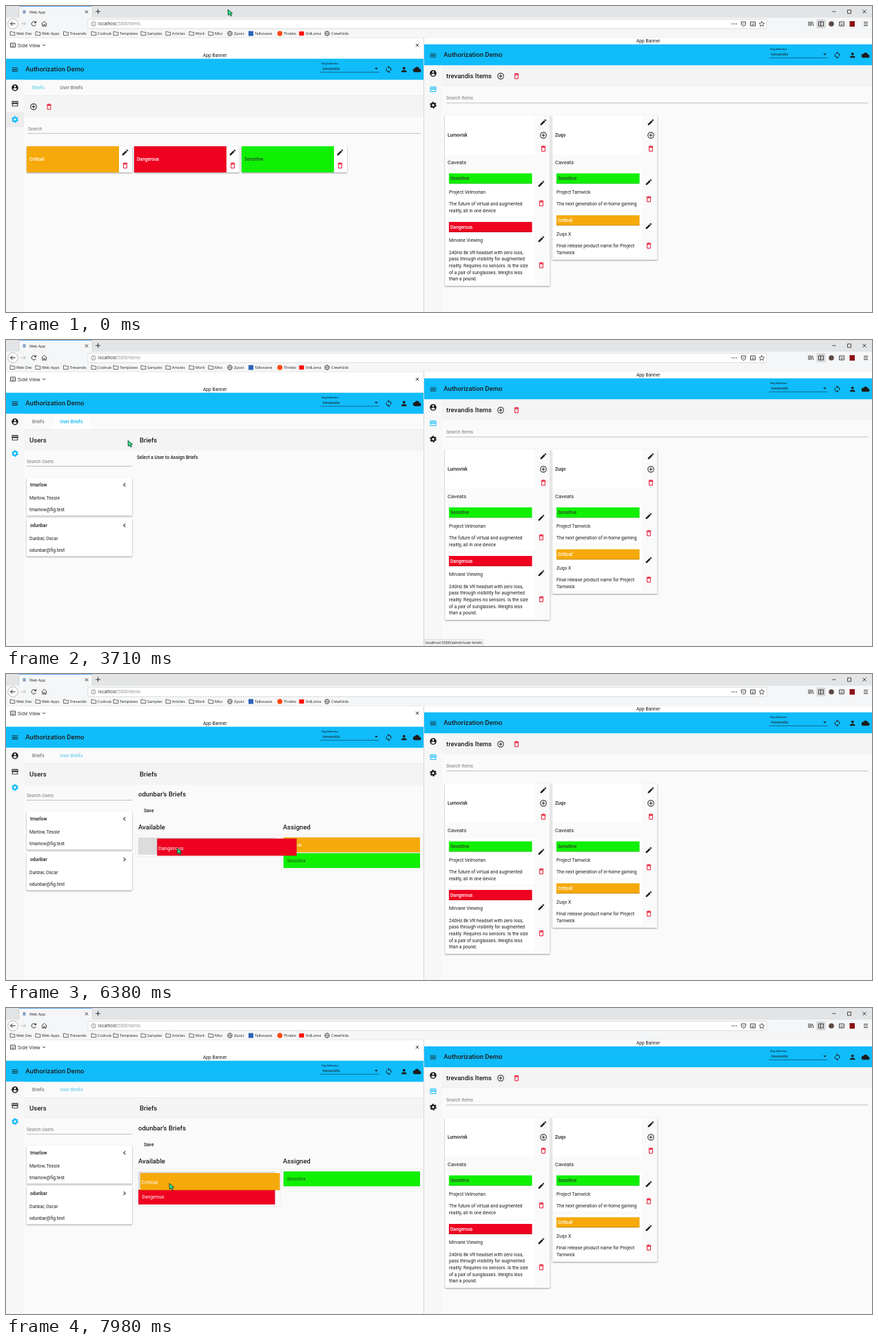
Write an HTML page that moves like this. It is 1257 by 445 pixels and loops after 8 s.

```html
<!DOCTYPE html>
<html lang="en">
<head>
<meta charset="utf-8">
<title>Authorization Demo</title>
<style>
html, body { margin: 0; width: 100%; height: 100%; overflow: hidden; background: #fafafa; }
svg { display: block; width: 100%; height: 100%; }
text { font-family: Roboto, sans-serif; white-space: pre; }
.ui { font-family: "Open Sans", "Noto Sans", sans-serif; }
.card { filter: drop-shadow(0 1px 1px rgba(0,0,0,.38)); }
.drag { filter: drop-shadow(0 .7px .7px rgba(0,0,0,.32)); }
</style>
</head>
<body>
<svg id="stage" viewBox="0 0 1257 445"></svg>
<script>
const LOOP = 8000;
const BLUE = '#10bcfa', RED = '#e8112d', INK = '#1c1c1c', GREY = '#7c7c7c';
const BODY = 6.7, HEAD = 9.56;
const BRIEF = {
  Critical: { fill: '#f6a90a', ink: '#fff' },
  Dangerous: { fill: '#ee0220', ink: '#fff' },
  Sensitive: { fill: '#10f004', ink: '#27472a' }
};
const ORG = 'trevandis';

const ICON = {
  menu: 'M3 18h18v-2H3zM3 13h18v-2H3zM3 6v2h18V6z',
  account: 'M12 2a10 10 0 1 0 0 20a10 10 0 1 0 0-20zM12 5a3 3 0 1 1 0 6a3 3 0 1 1 0-6zM12 19.2c-2.5 0-4.7-1.3-6-3.2c0-2 4-3.1 6-3.1s6 1.1 6 3.1c-1.3 1.9-3.5 3.2-6 3.2z',
  store: 'M3 4h18l1 6a3 3 0 0 1-1 2v8H3v-8a3 3 0 0 1-1-2zM5 13h14v5H5zM5 6h3v4H4.3zM10 6h4v4h-4zM16 6h3l.7 4H16z',
  edit: 'M3 17.2V21h3.8L17.8 9.9l-3.7-3.7zM20.7 7c.4-.4.4-1 0-1.4l-2.3-2.3c-.4-.4-1-.4-1.4 0l-1.9 1.8l3.8 3.8z',
  trash: 'M6 7h12v12a2 2 0 0 1-2 2H8a2 2 0 0 1-2-2zM8 9h8v10H8zM15.5 4l-1-1h-5l-1 1H5v2h14V4z',
  add: 'M13 7h-2v4H7v2h4v4h2v-4h4v-2h-4zM12 2a10 10 0 1 0 0 20a10 10 0 1 0 0-20zM12 4a8 8 0 1 1 0 16a8 8 0 1 1 0-16z',
  person: 'M12 4a4 4 0 1 0 0 8a4 4 0 1 0 0-8zM12 14c-2.7 0-8 1.3-8 4v2h16v-2c0-2.7-5.3-4-8-4z',
  cloud: 'M19.3 10A7.5 7.5 0 0 0 5.3 8A6 6 0 0 0 6 20h13a5 5 0 0 0 .3-10z',
  sync: 'M12 4V1L8 5l4 4V6a6 6 0 0 1 5.3 8.8l1.5 1.5A8 8 0 0 0 12 4zM12 18a6 6 0 0 1-5.3-8.8L5.2 7.7A8 8 0 0 0 12 20v3l4-4l-4-4z',
  left: 'M15.4 7.4L14 6l-6 6l6 6l1.4-1.4L10.8 12z',
  right: 'M10 6L8.6 7.4l4.6 4.6l-4.6 4.6L10 18l6-6z',
  drop: 'M7 10l5 5l5-5z'
};

// Drawing helpers; text is placed by its left edge and cap centre.
const text = (x, cy, s, size = BODY, fill = INK, weight = 400, cls = '') =>
  `<text x="${x}" y="${cy + size * .355}" font-size="${size}" fill="${fill}" font-weight="${weight}" class="${cls}">${s}</text>`;
const bold = (x, cy, s, size = BODY, fill = INK) => text(x, cy, s, size, fill, 500);
const ui = (x, cy, s, size = 5.5, fill = '#222') => text(x, cy, s, size, fill, 400, 'ui');
const rect = (x, y, w, h, fill, more = '') =>
  `<rect x="${x}" y="${y}" width="${w}" height="${h}" fill="${fill}" ${more}/>`;
const line = (d, stroke = '#333', w = .9, more = '') =>
  `<path d="${d}" fill="none" stroke="${stroke}" stroke-width="${w}" ${more}/>`;
const dot = (cx, cy, r, fill, more = '') => `<circle cx="${cx}" cy="${cy}" r="${r}" fill="${fill}" ${more}/>`;
const icon = (name, cx, cy, fill = INK, size = 11.5) =>
  `<path d="${ICON[name]}" fill="${fill}" fill-rule="evenodd" transform="translate(${cx - size / 2} ${cy - size / 2}) scale(${size / 24})"/>`;
const gear = (cx, cy, c) =>
  dot(cx, cy, 2.7, 'none', `stroke="${c}" stroke-width="2"`) +
  dot(cx, cy, 4, 'none', `stroke="${c}" stroke-width="1.6" stroke-dasharray="2.39 1.8"`);
const group = (id, body, more = '') => `<g id="${id}" ${more}>${body}</g>`;
const card = (x, y, w, h, body) => `<g class="card">${rect(x, y, w, h, '#fff', 'rx="1"')}</g>${body}`;
const tools = (x, y1, y2) => icon('edit', x, y1) + icon('trash', x, y2, RED);

const folder = (x, cy) => line(`M${x} ${cy + 2.6}v-5.4h2.6l.8 1h3.4v4.4z`, '#444', .8);
const globe = (x, cy) =>
  dot(x + 4, cy, 3.4, 'none', 'stroke="#444" stroke-width=".8"') +
  line(`M${x + .6} ${cy}h6.8M${x + 4} ${cy - 3.4}q-3.2 3.4 0 6.8q3.2-3.4 0-6.8`, '#444', .6);
const cross = (x, y, r, c = '#222') => line(`M${x - r} ${y - r}l${2 * r} ${2 * r}m0 ${-2 * r}l${-2 * r} ${2 * r}`, c, .9);
const panel = (x, y) => line(`M${x - 3.5} ${y - 3}h7v6h-7zM${x - 1.7} ${y - .8}h1.2m1.2 0h1.2M${x - 1.7} ${y + 1.2}h3.4`, '#333', .9);

function browser() {
  const folders = [[6, 'Web Dev'], [43, 'Web Apps'], [83.5, 'Trevandis'], [124, 'Codnub'], [156, 'Templates'],
    [196, 'Samples'], [232, 'Articles'], [266, 'Work'], [294, 'Misc']];
  const links = [[321, 'Zpost'], [351, 'Talkovane', rect(352, 36.5, 7, 7, '#2d63b8')], [393, 'Threbo', dot(397.5, 40, 3.7, '#ff4a12')],
    [425, 'VidLoma', rect(425.5, 37, 7, 6, '#f00')], [462, 'Crewfolds']];
  return rect(0, 0, 1257, 17, '#e3e4e6') + rect(0, 17, 1257, 29.5, '#f5f6f7') +
    rect(19, 0, 106, 17, '#f5f6f7') + rect(19, 0, 106, .7, '#1a8cff') +
    line('M18.7 1v15.5M125.3 1v15.5', '#c5c6c8', .6) +
    rect(24.5, 6, 4, 5, '#8aa4c4') + ui(34, 8.8, 'Web App') + cross(117, 8.5, 2.1) +
    line('M130 8h7M133.5 4.5v7', '#222') +
    line('M1199.5 8.2h5') + line('M1221.5 5.8h5v5h-5z') + cross(1246, 8.2, 2.5) +
    dot(10, 25.8, 7.3, '#fff', 'stroke="#aaa" stroke-width=".8"') +
    line('M13.5 25.8h-7m3-3l-3 3l3 3', '#222', 1) +
    line('M21.5 25.8h7m-3-3l3 3l-3 3', '#b9babc', 1) +
    line('M43 24a3.2 3.2 0 1 0 .3 3M43.6 22v2.5h-2.5', '#333', 1) +
    line('M51.5 26l4-3.7l4 3.7M52.8 25.5v3.8h2v-2.3h1.5v2.3h2v-3.8', '#333') +
    rect(119, 19.2, 985, 13.6, '#fff', 'rx="1" stroke="#cfd0d2" stroke-width=".7"') +
    dot(127, 26, 3.2, 'none', 'stroke="#666" stroke-width=".7"') + line('M127 25.5v2.2M127 24v.8', '#666', .8) +
    ui(134, 26, 'localhost<tspan fill="#85878b">:5000/items</tspan>', 6.3) +
    [1054, 1057, 1060].map(x => dot(x, 26, .8, '#333')).join('') +
    line('M1067.3 23h6.4v3q-.3 2.5-3.2 3.5q-2.9-1-3.2-3.5zM1069 25.2l1.5 1.5l1.5-1.5') + panel(1084, 26) +
    line('M1097 22.3l1.1 2.5l2.7.3l-2 1.8l.6 2.7l-2.4-1.4l-2.4 1.4l.6-2.7l-2-1.8l2.7-.3z', '#333', .8) +
    line('M1165 22.5v6.5M1167 22.5v6.5M1169 22.5v6.5M1170.5 23l1.6 6', '#333') +
    rect(1176.5, 19.5, 13, 13, '#d5d6d8', 'rx="1"') + line('M1179.5 23h7v6h-7zM1182.5 23v6', '#333') +
    dot(1198, 26, 3.8, '#5a4a44') + panel(1213, 26) + rect(1224.5, 22, 7.5, 8, '#8c1016') +
    line('M1245 23.5h6M1245 26h6M1245 28.5h6', '#333') +
    folders.map(([x, s]) => folder(x, 40) + ui(x + 9, 40.5, s)).join('') +
    links.map(([x, s, mark]) => (mark || globe(x, 40)) + ui(x + 10, 40.5, s)).join('') +
    rect(0, 46, 606, 21.5, '#fff') + line('M0 46.3h1257', '#d8d8d8', .6) +
    panel(10, 57) + ui(17, 57, 'Side View', 7.4) + line('M53.2 56l1.9 1.9l1.9-1.9', '#333', 1) + cross(597, 57, 2.2);
}

function app(x, y, w, banner, active) {
  const r = x + w, cy = y + 15.2;
  const tone = n => n === active ? BLUE : INK;
  return rect(x, y - 9.5, w, 9.5, '#fff') + text(banner, y - 4.8, 'App Banner') +
    rect(x, y + 30.6, w, 445 - y - 30.6, '#fafafa') +
    rect(x, y, w, 30.6, BLUE) + icon('menu', x + 13, cy + .5) + bold(x + 28.3, cy, 'Authorization Demo', HEAD) +
    bold(r - 148, y + 6.3, 'Org Selector', 4.4, '#0b2e3c') + text(r - 146.5, y + 14.2, ORG, 6.1) +
    line(`M${r - 149.5} ${y + 19.6}h85`, '#0b4a63', .7) + icon('drop', r - 68.5, y + 14.3) +
    icon('sync', r - 50.5, cy + .5) + icon('person', r - 28.3, cy + .5) + icon('cloud', r - 9.3, cy + .5) +
    rect(x, y + 30.6, 26, 415, '#f7f7f7') +
    icon('account', x + 13, y + 42.2) + icon('store', x + 13, y + 65.3, tone(1)) + gear(x + 13, y + 88.3, tone(0));
}

function briefCard(name, x) {
  const b = BRIEF[name];
  return card(x, 204, 153, 38, rect(x, 204, 134, 38, b.fill) + bold(x + 4, 222.5, name, BODY, b.ink) + tools(x + 143, 213, 232));
}

function userCard(y, id, name, mail, arrow) {
  return card(30, y, 153, 55.5, bold(35, y + 10.5, id) + text(34, y + 29.5, name) + text(34, y + 46.5, mail) + arrow);
}

function caveat(x, y, h, name, title, lines, y1, y2) {
  const b = BRIEF[name];
  return rect(x + 2, y - 4, 128, h, '#fff') + rect(x + 5.9, y, 120.7, 15, b.fill) +
    rect(x + 5.9, y + 14.4, 120.7, .6, 'rgba(0,0,0,.3)') +
    bold(x + 8, y + 7.5, name, BODY, b.ink) + text(x + 6, y + 27.1, title) +
    lines.map((s, i) => text(x + 6, y + 44.4 + i * 9.65, s)).join('') + tools(x + 140, y1, y2);
}

function itemCard(x, h, name, body) {
  return `<g class="card">${rect(x, 159, 152.5, h, '#fafafa', 'rx="1"')}</g>` + rect(x, 159, 130, 57, '#fff') +
    bold(x + 4, 187.5, name) + icon('edit', x + 143, 169) + icon('add', x + 143, 188) +
    icon('trash', x + 143, 207.5, RED) + text(x + 4, 227, 'Caveats', 7.6) + body;
}

function rightApp() {
  return app(607, 55.8, 650, 915, 1) + rect(633, 86.4, 624, 30.6, '#f4f4f4') +
    bold(639, 102, ORG + ' Items', HEAD) + icon('add', 718, 102) + icon('trash', 741, 102, RED) +
    text(639, 134, 'Search Items', BODY, GREY) + line('M639 141h612', '#999', .6) +
    itemCard(637, 248, 'Lumovisk',
      caveat(637, 243.4, 67, 'Sensitive', 'Project Velmorian', ['The future of virtual and augmented', 'reality, all in one device'], 258.5, 287) +
      caveat(637, 314, 93, 'Dangerous', 'Mirvane Viewing', ['240Hz 8k VR headset with zero loss,', 'pass through visibility for augmented',
        'reality. Requires no sensors. Is the size', 'of a pair of sunglasses. Weighs less', 'than a pound.'], 339, 377)) +
    itemCard(793, 210, 'Zuqo',
      caveat(793, 243.4, 56, 'Sensitive', 'Project Tarnwick', ['The next generation of in-home gaming'], 256, 281) +
      caveat(793, 304.3, 64, 'Critical', 'Zuqo X', ['Final release product name for Project', 'Tarnwick'], 320, 348.5));
}

// Geometry of the two brief lists.
const LIST = { a: 192.2, b: 402.8, top: 237.7, step: 22.9, gap: 3.5 };

function leftApp() {
  const bar = rect(26, 130.8, 580, 30.4, '#f4f4f4');
  const outline = 'stroke="#ebebeb" stroke-width=".8"';
  return app(0, 76.7, 606, 286, 0) + line('M26 130.7h580', '#dcdcdc', .7) +
    group('railGlow', rect(0, 154, 26, 22, '#ececec') + gear(13, 165, BLUE)) +
    group('tabGlow', rect(69, 108, 54, 22, '#fff', 'opacity=".7"')) +
    group('tabA', bold(38, 119, 'Briefs')) + group('tabB', bold(78.3, 119, 'User Briefs')) +
    group('briefs', bar + icon('add', 40, 146.5) + icon('trash', 62.5, 146.5, RED) + text(32, 178.5, 'Search', BODY, GREY) +
      line('M31 185.3h571', '#999', .6) + Object.keys(BRIEF).map((n, i) => briefCard(n, 30 + i * 156)).join('')) +
    group('users', bar + bold(34, 146, 'Users', HEAD) + bold(194, 146, 'Briefs', HEAD) +
      text(30, 176.5, 'Search Users', BODY, GREY) + line('M30 183.5h153', '#999', .6) +
      userCard(200, 'tmarlow', 'Marlow, Tessie', 'tmarlow@fig.test', icon('left', 172, 210.5)) +
      userCard(259, 'odunbar', 'Dunbar, Oscar', 'odunbar@fig.test',
        group('shut', icon('left', 172, 269.5)) + group('open', icon('right', 172, 269.5))) +
      group('hint', bold(190, 171, 'Select a User to Assign Briefs')) +
      group('picker', bold(192, 174.5, "odunbar's Briefs", HEAD) + bold(200, 198.5, 'Save') +
        bold(192, 222.5, 'Available', HEAD) + bold(402, 222.5, 'Assigned', HEAD) +
        rect(188.5, 234, 209.5, 28, '#fafafa', outline + ' id="listA"') + rect(399.5, 234, 205.5, 74, '#fafafa', outline + ' id="listB"') +
        rect(0, 0, 199, 25, '#dcdcdc', 'id="slot"') + Object.keys(BRIEF).map(chip).join('')));
}

// One brief in a list, with a larger face while it is being dragged.
function chip(name) {
  const b = BRIEF[name];
  return group(name, group(name + 'Flat', rect(0, 0, 198.2, 21.5, b.fill) + text(5.3, 10.8, name, BODY, b.ink)) +
    group(name + 'Lift', rect(0, 0, 202.3, 24.8, b.fill) + text(1.5, 13.6, name, 7.65, b.ink)), 'class="drag"');
}

const pointer = group('cursor',
  group('arrow', '<path d="M0 0L.4 8.4L2.4 6.8L4 9.7L5.6 8.8L4.2 6.1L6.7 5.6z"/>') +
  group('hand', '<path d="M1.2.4Q2.4-.6 3 .8L3.8 3.8L6.6 4.4Q8.3 4.9 8 6.8L7.3 10H3L.4 6.8Q.2 5.4 2 6z"/>'),
  'fill="#2fe08a" stroke="#12452c" stroke-width=".9" stroke-linejoin="round"');

document.getElementById('stage').innerHTML = browser() + leftApp() + rightApp() +
  line('M606.5 46v399', '#d0d0d0', .8) +
  group('status', rect(607, 435.5, 86, 10, '#f0f0f0', 'stroke="#ccc" stroke-width=".5"') + ui(609, 440.5, 'localhost:5000/admin/user-briefs', 5.3)) +
  pointer;

const el = id => document.getElementById(id);
const show = (id, on) => el(id).setAttribute('display', on ? 'inline' : 'none');
const place = (id, x, y) => el(id).setAttribute('transform', `translate(${x} ${y})`);
const ramp = (t, start, length) => { const u = Math.min(1, Math.max(0, (t - start) / length)); return u * u * (3 - 2 * u); };
const between = (t, a, b) => t >= a && t < b;
const mix = (a, b, u) => a + (b - a) * u;

// Pointer track: time, x, y.
const TRACK = [
  [0, 322, 5], [1720, 322, 5], [2410, 185, 98], [2550, 131, 112], [2760, 99, 118], [3370, 95, 119], [3450, 97, 119],
  [3710, 177, 146], [4180, 172, 266], [4520, 173, 268], [4980, 377, 268], [5070, 388, 269], [5400, 426, 271],
  [5890, 432, 274], [5940, 428, 275], [6480, 232, 251], [6740, 230, 251], [7080, 425, 248], [7250, 445, 253],
  [7330, 445, 253], [7545, 303, 246], [7720, 246, 254], [7980, 237, 255], [8000, 237, 255]
];

function slope(i, k) {
  if (!TRACK[i - 1] || !TRACK[i + 1]) return 0;
  const [p, c, n] = TRACK.slice(i - 1, i + 2);
  const a = (c[k] - p[k]) / (c[0] - p[0]), b = (n[k] - c[k]) / (n[0] - c[0]);
  return a * b <= 0 ? 0 : 2 * a * b / (a + b);
}

function pointerAt(t) {
  let i = 0;
  while (i < TRACK.length - 2 && t >= TRACK[i + 1][0]) i++;
  const a = TRACK[i], b = TRACK[i + 1], h = b[0] - a[0], u = (t - a[0]) / h, v = 1 - u;
  return [1, 2].map(k => v * v * (1 + 2 * u) * a[k] + u * u * (3 - 2 * u) * b[k] +
    h * u * v * (v * slope(i, k) - u * slope(i + 1, k)));
}

const TAB = 2900, PICK = 4450;
const GRAB1 = 5890, ENTER1 = 6060, DROP1 = 6600, LAND1 = 6800;
const GRAB2 = 7330, ENTER2 = 7420;

function render(t) {
  const [x, y] = pointerAt(t);
  const users = t >= TAB, picked = t >= PICK;
  show('briefs', !users);
  show('users', users);
  show('railGlow', !users);
  show('tabGlow', between(t, 2700, PICK));
  el('tabA').firstChild.setAttribute('fill', users ? GREY : '#6fd0ea');
  el('tabB').firstChild.setAttribute('fill', !users ? (t > 2700 ? '#333' : GREY) : picked ? '#6fd0ea' : BLUE);
  show('status', between(t, 2680, 3740));
  show('hint', !picked);
  show('picker', picked);
  show('shut', !picked);
  show('open', picked);

  const { a, b, top, step, gap } = LIST, wide = step + gap;
  const drag1 = between(t, GRAB1, LAND1), drag2 = t >= GRAB2;
  const home = ramp(t, DROP1, LAND1 - DROP1), in1 = ramp(t, ENTER1, 130), in2 = ramp(t, ENTER2, 130);
  if (drag1) place('Dangerous', mix(x - 29, a, home), mix(y - 13.7, top, home));
  else if (t < GRAB1) place('Dangerous', b, top + step);
  else place('Dangerous', a, top + wide * in2);
  if (drag2) place('Critical', x - 42, y - 15);
  else place('Critical', b, top);
  place('Sensitive', b, top + 2 * step + gap * ((t >= GRAB1) + drag2) - wide * (in1 + in2));
  for (const [name, on] of [['Dangerous', drag1], ['Critical', drag2], ['Sensitive', false]]) {
    show(name + 'Flat', !on);
    show(name + 'Lift', on);
  }
  // The held brief is painted above the others.
  const held = el(drag1 ? 'Dangerous' : 'Critical');
  if (el('picker').lastChild !== held) el('picker').appendChild(held);

  show('slot', drag1 || drag2);
  const moved = drag1 ? t >= ENTER1 : t >= ENTER2;
  place('slot', moved ? a - .5 : b, drag1 && !moved ? top + step : top);
  const countA = (t >= ENTER1) + (t >= ENTER2);
  el('listA').setAttribute('height', Math.max(28, 5 + step * countA + (drag1 || drag2 ? gap : 0)));
  el('listB').setAttribute('height', 5 + step * (3 - countA));

  const hand = between(t, 2700, 3490) || between(t, 4120, 4570) || between(t, 5200, GRAB1) || between(t, 7030, GRAB2);
  show('hand', hand);
  show('arrow', !hand);
  place('cursor', x, y);
}

const start = performance.now();
function frame() {
  render((performance.now() - start) % LOOP);
  requestAnimationFrame(frame);
}
frame();
</script>
</body>
</html>
```
